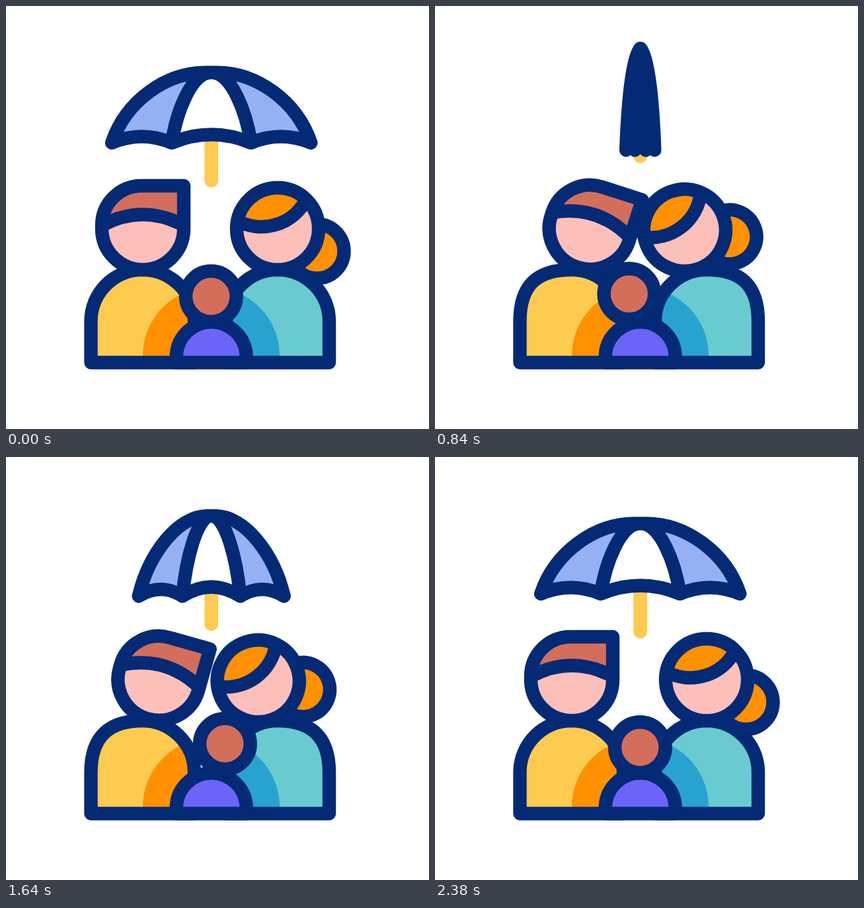
These frames come from a looping animation (640x640 px, 2400 ms). An HTML page:

```html
<!DOCTYPE html>
<html lang="en">
<head>
<meta charset="utf-8">
<title>Family under an umbrella</title>
<style>
html, body { margin: 0; width: 100%; height: 100%; overflow: hidden; background: #fff; }
svg { display: block; width: 100vw; height: 100vh; }
.line { fill: none; stroke: #042a76; stroke-width: 20.4; stroke-linecap: round; stroke-linejoin: round; }
</style>
</head>
<body>
<svg viewBox="0 0 640 640">
  <defs>
    <clipPath id="manClip"><path class="manBody"/></clipPath>
    <clipPath id="womanClip"><path class="womanBody"/></clipPath>
  </defs>

  <path id="stick" fill="none" stroke="#fdcb50" stroke-width="20.8" stroke-linecap="round"/>
  <path id="canopy" fill="#96b1f3"/>
  <path id="panel" fill="#fff"/>
  <path id="frame" class="line"/>

  <path class="manBody" fill="#fdcb50"/>
  <circle cx="310.5" cy="529" r="103.5" fill="#ff9100" clip-path="url(#manClip)"/>
  <path class="manBody line"/>

  <path class="womanBody" fill="#69cbd0"/>
  <circle cx="310.5" cy="529" r="103.5" fill="#28a3cf" clip-path="url(#womanClip)"/>
  <path class="womanBody line"/>

  <g id="manHead">
    <path fill="#fdbfba" d="M269 272H205A60 60 0 0 0 145 332V337A62 62 0 0 0 269 337Z"/>
    <path fill="#d36e5b" d="M269 272H205A60 60 0 0 0 145 332Q207 299 269 332Z"/>
    <path class="line" d="M269 272H205A60 60 0 0 0 145 332V337A62 62 0 0 0 269 337ZM145 332Q207 299 269 332"/>
  </g>

  <g id="womanHead">
    <circle cx="470.5" cy="371" r="41" fill="#ff9100"/>
    <circle cx="470.5" cy="371" r="41" class="line"/>
    <circle cx="411" cy="337" r="62" fill="#fdbfba"/>
    <path fill="#ff9100" d="M350.5 325A76 76 0 0 0 453.5 294A62 62 0 0 0 350.5 325Z"/>
    <circle cx="411" cy="337" r="62" class="line"/>
    <path class="line" d="M350.5 325A76 76 0 0 0 453.5 294"/>
  </g>

  <path fill="#6c63f8" d="M257.8 539.5V531A52.9 52.9 0 0 1 363.6 531V539.5Z"/>
  <path class="line" d="M257.8 539.5V531A52.9 52.9 0 0 1 363.6 531V539.5Z"/>
  <g id="childHead">
    <circle cx="310.3" cy="439.3" r="38.3" fill="#d36e5b"/>
    <circle cx="310.3" cy="439.3" r="38.3" class="line"/>
  </g>
</svg>
<script>
const LOOP = 2400, MID = 310.7;
const $ = id => document.getElementById(id);
const mix = (a, b, p) => a + (b - a) * p;

// cubic-bezier(.8, 0, .2, 1)
function ease(x) {
  if (x <= 0) return 0;
  if (x >= 1) return 1;
  let lo = 0, hi = 1, s = 0.5;
  for (let i = 0; i < 30; i++) {
    const r = 1 - s;
    if (2.4 * s * r * r + 0.6 * s * s * r + s * s * s < x) lo = s; else hi = s;
    s = (lo + hi) / 2;
  }
  return s * s * (3 - 2 * s);
}

// keys: [time, value], eased between neighbours
function track(keys, t) {
  let v = keys[0][1];
  for (let i = 1; i < keys.length; i++) {
    const [t0, v0] = keys[i - 1], [t1, v1] = keys[i];
    if (t >= t0) v = mix(v0, v1, ease((t - t0) / (t1 - t0)));
  }
  return v;
}

const FOLD = [[0, 0], [1200, 1], [2000, 0]];
const LEAN = [[0, 0], [1200, 1], [2300, 0]];
const CHILD_X = [[0, 0], [670, -18], [1420, 22], [2340, 0]];
const CHILD_Y = [[0, 0], [670, -3.6], [1420, -5.6], [2340, 0]];

function drawUmbrella(p) {
  const m = (a, b) => mix(a, b, p);
  const top = m(100.6, 61.2), hem = m(207, 219);
  const tip = m(150.6, 11), joint = m(60, 4);
  const at = (x, y) => `${x} ${y} `;
  const L = (w, y) => at(MID - w, y), R = (w, y) => at(MID + w, y);

  const edge1 = [m(129, 10), m(143, 150)], edge2 = [m(67.7, 6.5), top], flat = m(9, 0.5);
  const rib1 = [m(52.5, 4), m(160, 150)], rib2 = [m(30.5, 2.5), top];
  const sideDip = hem - m(19, 24), midDip = hem - m(25, 35);
  const sideX = (tip + joint) / 2;

  const dome = 'M' + L(tip, hem) + 'C' + L(...edge1) + L(...edge2) + L(flat, top) +
    'L' + R(flat, top) + 'C' + R(...edge2) + R(...edge1) + R(tip, hem);
  const hemLine = 'Q' + R(sideX, sideDip) + R(joint, hem) + 'Q' + L(0, midDip) + L(joint, hem) +
    'Q' + L(sideX, sideDip) + L(tip, hem) + 'Z';
  const ribs = 'M' + L(joint, hem) + 'C' + L(...rib1) + L(...rib2) + L(0, top) +
    'C' + R(...rib2) + R(...rib1) + R(joint, hem);

  $('canopy').setAttribute('d', dome + hemLine);
  $('panel').setAttribute('d', ribs + 'Q' + L(0, midDip) + L(joint, hem) + 'Z');
  $('frame').setAttribute('d', dome + hemLine + ribs);
  $('stick').setAttribute('d', 'M' + L(0, (hem + midDip) / 2) + 'L' + L(0, m(264.2, 224.4)));
}

function setAll(cls, d) {
  document.querySelectorAll('.' + cls).forEach(e => e.setAttribute('d', d));
}

function drawBodies(q) {
  const rise = mix(434, 418, q), reach = mix(43.1, 49.5, q);
  setAll('manBody', `M128.5 539.5V477C128.5 ${rise} ${206.5 - reach} 399 206.5 399` +
    'C249.6 399 285 434 285 477V539.5Z');
  setAll('womanBody', `M489 539.5V477C489 ${rise} ${411 + reach} 399 411 399` +
    'C368 399 333 434 333 477V539.5Z');
}

function place(id, x, y, dx, dy, angle) {
  $(id).setAttribute('transform', `translate(${dx} ${dy}) rotate(${angle} ${x} ${y})`);
}

function draw(t) {
  const q = track(LEAN, t);
  drawUmbrella(track(FOLD, t));
  drawBodies(q);
  place('manHead', 207, 337, 30 * q, -0.8 * q, 19.3 * q);
  place('womanHead', 411, 337, -36 * q, 2.3 * q, -23 * q);
  place('childHead', 0, 0, track(CHILD_X, t), track(CHILD_Y, t), 0);
}

const start = performance.now();
function tick() {
  draw((performance.now() - start) % LOOP);
  requestAnimationFrame(tick);
}
draw(0);
requestAnimationFrame(tick);
</script>
</body>
</html>
```
